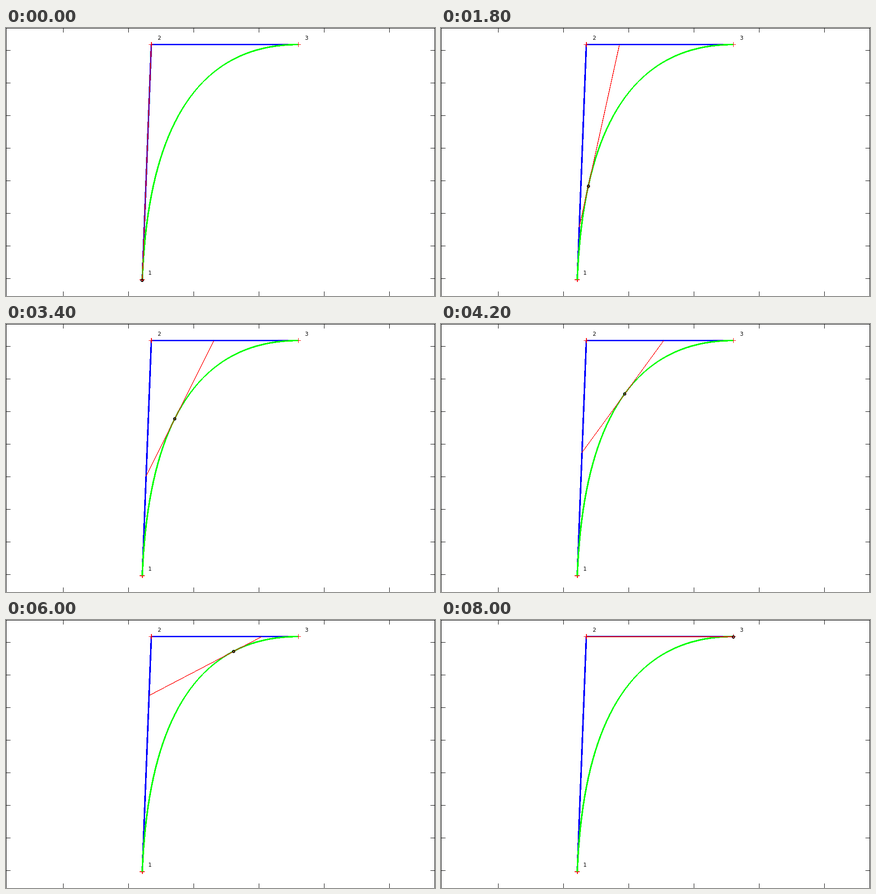
Write a matplotlib script that moves like this. It is 947 by 592 pixels and loops after 8200 ms.

```python
import numpy as np
import matplotlib.pyplot as plt
from matplotlib.animation import FuncAnimation

W, H, DPI = 947, 592, 64
STEPS = 40
BLACK, RED, GREEN, BLUE = (0, 0, 0), (255, 0, 0), (0, 255, 0), (0, 0, 255)
THICK, THIN = 3.5, 1.5
P1, P2, P3 = np.array([[300.8, 556], [320.8, 36.5], [645.5, 36.5]])


def px(size):
    """Pixels to points."""
    return size * 72 / DPI


def lerp(a, b, t):
    return a + (b - a) * t


def tangent(t):
    return lerp(P1, P2, t), lerp(P2, P3, t)


def bezier(t):
    return lerp(*tangent(t), t)


def stroke(img, a, b, color, width):
    """Hard-edged line whose width is measured across its minor axis."""
    steep = abs(b[1] - a[1]) > abs(b[0] - a[0])
    m = int(steep)
    view = img if steep else img.swapaxes(0, 1)
    if a[m] > b[m]:
        a, b = b, a
    for u in range(int(np.ceil(a[m] - 0.5)), int(np.ceil(b[m] - 0.5))):
        v = lerp(a[1 - m], b[1 - m], (u + 0.5 - a[m]) / (b[m] - a[m])) - 0.5
        lo, hi = np.ceil([v - width / 2, v + width / 2]).astype(int)
        view[u, lo:hi] = color


def draw_axes(img):
    stroke(img, (0, 0.5), (W, 0.5), BLACK, 1)
    for x in (0.5, W - 0.5):
        stroke(img, (x, 0), (x, H), BLACK, 1)
    for x in np.arange(126.5, W, 144):
        stroke(img, (x, 0), (x, 10), BLACK, 1)
        stroke(img, (x, H - 10), (x, H), BLACK, 1)
    for y in np.arange(49.5, H, 72):
        stroke(img, (0, y), (10, y), BLACK, 1)
        stroke(img, (W - 10, y), (W, y), BLACK, 1)


def draw_curve(img):
    stroke(img, P1, P2, BLUE, THICK)
    stroke(img, P2, P3, BLUE, THICK)
    for x, y in (P1, P2, P3):
        stroke(img, (x - 5.5, y), (x + 5.5, y), RED, THIN)
        stroke(img, (x, y - 5.5), (x, y + 5.5), RED, THIN)
    pts = [bezier(t) for t in np.linspace(0, 1, STEPS + 1)]
    for a, b in zip(pts, pts[1:]):
        stroke(img, a, b, GREEN, THICK)


base = np.full((H, W, 3), 255, np.uint8)
draw_axes(base)
draw_curve(base)

fig = plt.figure(figsize=(W / DPI, H / DPI), dpi=DPI, facecolor="white")
ax = fig.add_axes([0, 0, 1, 1])
ax.axis("off")
stage = ax.imshow(base, extent=(0, W, H, 0), aspect="auto",
                  interpolation="nearest")
for n, (x, y) in enumerate((P1, P2, P3), 1):
    ax.text(x + 13.2, y - 10.6, str(n), fontsize=px(12),
            family="DejaVu Sans", color="black", va="baseline")
dot = ax.plot([], [], "o", ms=px(5.2), mfc="none", mec="black",
              mew=px(1.8), snap=False)[0]
ax.set_xlim(0, W)
ax.set_ylim(H, 0)


def update(i):
    t = i / STEPS
    img = base.copy()
    a, b = tangent(t)
    stroke(img, a + (0, 0.5), b + (0, 0.5), RED, THIN)
    stage.set_data(img)
    x, y = np.floor(bezier(t)) + 0.5
    dot.set_data([x], [y])
    return stage, dot


anim = FuncAnimation(fig, update, frames=STEPS + 1, interval=200,
                     init_func=lambda: update(0), repeat=True, repeat_delay=0)
plt.show()
```
